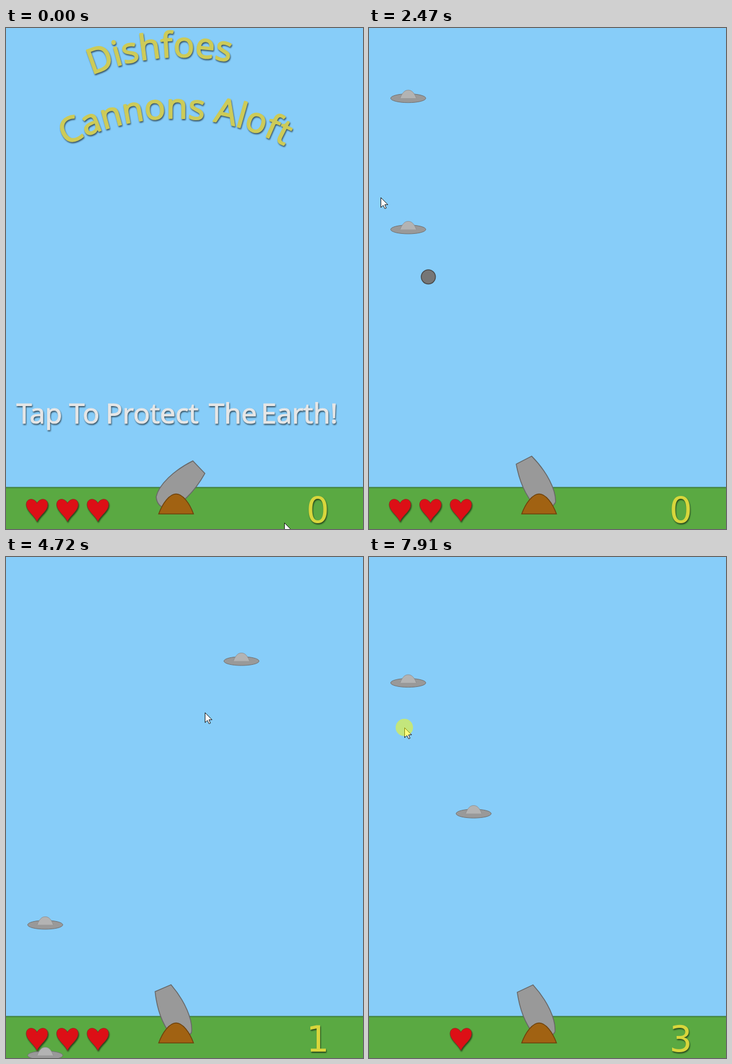
Animation, 616 px wide and 864 px high, one loop 7990 ms. Source, as an HTML page:

```html
<!DOCTYPE html>
<html lang="en">
<head>
<meta charset="utf-8">
<title>Cannon game</title>
<style>
  html, body { margin: 0; width: 100%; height: 100%; overflow: hidden; background: #87cdf9; }
  svg { display: block; width: 616px; height: 864px; }
  text { font-family: "Open Sans", sans-serif; stroke-linejoin: round; }
  .shadow { filter: drop-shadow(1px 2px 1px rgba(0, 0, 0, .6)); }
  .title { font-size: 60px; fill: #cdcb58; stroke: #cdcb58; stroke-width: 2; }
  .hint { font-size: 48px; fill: #e6e6e6; stroke: #e6e6e6; stroke-width: 1.2; }
  .score { font-family: "DejaVu Sans", sans-serif; font-size: 62px; fill: #d8d63c; }
</style>
</head>
<body>
<svg viewBox="0 0 616 864">
  <defs>
    <path id="arcTop" d="M148 81A400 400 0 0 1 460 82"/>
    <path id="arcLow" d="M103 203.5A400 400 0 0 1 520 227"/>
    <path id="heart" d="M0 38C-4 28-18 20-18.5 9C-18.5-3-4-3 0 7C4-3 18.5-3 18.5 9C18.5 20 4 28 0 38Z"
      fill="#dd0f16" stroke="#8f2a1c"/>
    <g id="ufo">
      <ellipse rx="30.3" ry="7.6" fill="#999" stroke="#707070"/>
      <path d="M-14 0C-10-10-6-14 0-14S10-10 14 0" fill="#b3b3b3" stroke="#8a8a8a" stroke-width=".8"/>
    </g>
  </defs>

  <rect width="616" height="864" fill="#87cdf9"/>
  <rect y="792" width="616" height="72" fill="#5aa942"/>
  <path d="M0 792.5H616" stroke="#3f7f3a" stroke-width="2"/>

  <g id="menu" class="shadow">
    <text class="title"><textPath href="#arcTop">Dishfoes</textPath></text>
    <text class="title"><textPath href="#arcLow">Cannons Aloft</textPath></text>
    <text class="hint" y="682"><tspan x="18">Tap</tspan> <tspan x="109">To</tspan>
      <tspan x="172">Protect</tspan> <tspan x="350">The</tspan> <tspan x="440">Earth!</tspan></text>
  </g>

  <g id="ufos"></g>
  <circle id="ball" r="12.2" fill="#767676" stroke="#484848" stroke-width="1.5"/>
  <path id="barrel" d="M-14-55.5H16C27-20 27 15 16 34Q0 44-13 33C-25 15-25-20-14-55.5Z"
    fill="#999" stroke="#676767" stroke-width="1.5"/>
  <path d="M263.5 838C270 820 282 803.500 293.500 803.500S317 820 323.500 838Z"
    fill="#a16212" stroke="#6e420c" stroke-width="1.5"/>
  <g id="hearts" class="shadow">
    <use href="#heart" x="53.500" y="813"/>
    <use href="#heart" x="106" y="813"/>
    <use href="#heart" x="158.500" y="813"/>
  </g>
  <text id="score" class="score shadow" x="518.300" y="853">0</text>

  <path id="cursor" d="M0 0V17L4 13.300L6.800 19L9.300 18L6.700 12.200H12Z" fill="#fff" stroke="#111"/>
  <circle id="press" r="15" fill="#ff0" opacity=".5"/>
</svg>

<script>
const LOOP = 7990, START = 1090;
const PIVOT = { x: 292, y: 795 };
const BALL_SPEED = 0.8;
const $ = id => document.getElementById(id);

// Each saucer passes height y at time t; it exists from `from` until `to`.
const saucers = [
  { x: 67.7, t: 1550, y: 138, v: 0.2276, from: 1180, to: 5120 },
  { x: 67.7, t: 3320, y: 315, v: 0.2281, from: 2180, to: 6110 },
  { x: 67.7, t: 3320, y: 89.5, v: 0.2280, from: 3170, to: 4510 },
  { x: 406.3, t: 4720, y: 179.5, v: 0.2287, from: 4180, to: 5893 },
  { x: 406.3, t: 5640, y: 160.5, v: 0.2236, from: 5180, to: 7258 },
  { x: 180.6, t: 6820, y: 198.5, v: 0.2239, from: 6180, to: LOOP },
  { x: 67.7, t: 7910, y: 217, v: 0.2240, from: 7125, to: LOOP }
];
const shots = [
  { from: START + 30, to: 1925, angle: 18.2 },
  { from: 1955, to: 2810, angle: -27.4 },
  { from: 3900, to: 4510, angle: -23.4 },
  { from: 5465, to: 5893, angle: 18.6 },
  { from: 6930, to: 7258, angle: 18.6 }
];
const hitTimes = [4510, 5893, 7258];
const lossTimes = [5120, 6110];
const presses = [[860, START], [1780, 1950], [3720, 3890], [5300, 5460], [6770, 6810], [7840, LOOP]];

// Rows are [time, value, ...].
const aim = [
  [0, 46.3], [START - 1, 46.3], [START, 18], [1400, 18], [1550, -13.5], [1640, -24], [1950, -27.4],
  [3330, -27.4], [3430, -23.2], [4725, -23.2], [4990, 17.8], [7350, 17.8], [7680, -25]
];
const pointer = [
  [0, 480, 853], [710, 331, 677], [1200, 331, 677], [1400, 192, 441], [1550, 28, 300], [1900, 20, 292],
  [3000, 20, 292], [3250, 46, 255], [4430, 46, 255], [4720, 343, 268], [4920, 468, 272],
  [7280, 468, 272], [7650, 61, 294]
];

function sample(keys, t) {
  const i = keys.findIndex(k => k[0] > t);
  if (i < 0) return keys[keys.length - 1].slice(1);
  const a = keys[i - 1], b = keys[i];
  const p = (t - a[0]) / (b[0] - a[0]);
  return a.slice(1).map((v, n) => v + (b[n + 1] - v) * p);
}

const show = (el, on) => el.setAttribute("visibility", on ? "visible" : "hidden");
const move = (el, x, y, angle = 0) => el.setAttribute("transform", `translate(${x} ${y}) rotate(${angle})`);
const countPast = (times, t) => times.filter(time => t >= time).length;

for (const s of saucers) {
  s.el = document.createElementNS("http://www.w3.org/2000/svg", "use");
  s.el.setAttribute("href", "#ufo");
  $("ufos").append(s.el);
}

function draw(t) {
  show($("menu"), t < START);

  for (const s of saucers) {
    show(s.el, t >= s.from && t < s.to);
    move(s.el, s.x, s.y + (t - s.t) * s.v);
  }

  const shot = shots.find(s => t >= s.from && t < s.to);
  show($("ball"), shot);
  if (shot) {
    const d = (t - shot.from) * BALL_SPEED, a = shot.angle * Math.PI / 180;
    move($("ball"), PIVOT.x + d * Math.sin(a), PIVOT.y - d * Math.cos(a));
  }

  move($("barrel"), PIVOT.x, PIVOT.y, sample(aim, t)[0]);

  const lost = countPast(lossTimes, t);
  [...$("hearts").children].forEach((heart, i) => show(heart, i >= lost));
  $("score").textContent = countPast(hitTimes, t);

  const [x, y] = sample(pointer, t);
  move($("cursor"), x + 0.5, y + 0.5);
  move($("press"), x, y);
  show($("press"), presses.some(([from, to]) => t >= from && t < to));
}

let begin;
function tick(now) {
  begin ??= now;
  draw(Math.max(0, now - begin) % LOOP);
  requestAnimationFrame(tick);
}
draw(0);
requestAnimationFrame(tick);
</script>
</body>
</html>
```
